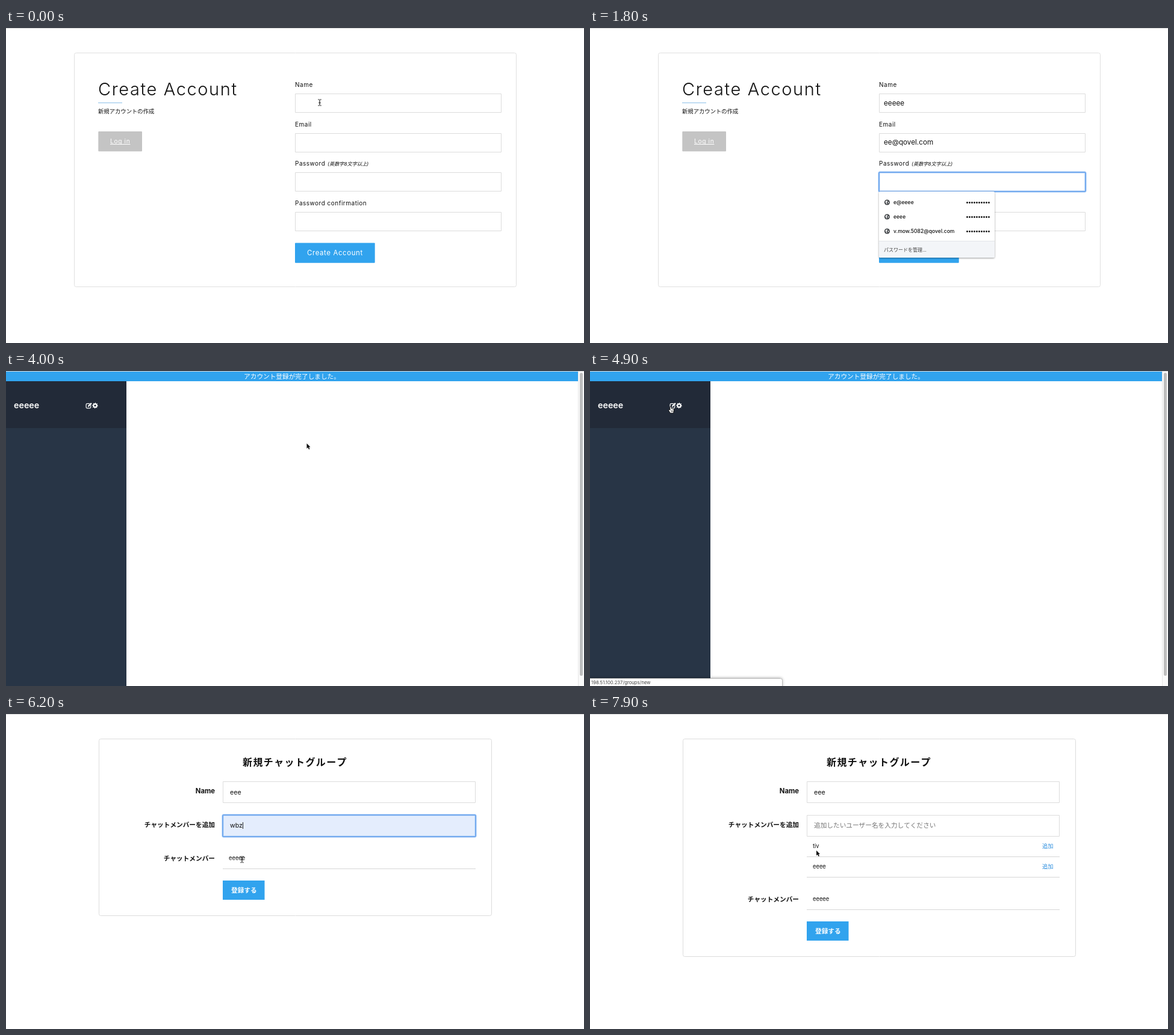
Recreate the animation shown at these times as an HTML page with a canvas. Size 960x524 px, loop 8000 ms.

```html
<!DOCTYPE html>
<html lang="ja">
<head>
<meta charset="utf-8">
<title>Sign up and new group</title>
<style>
html, body { margin: 0; width: 100%; height: 100%; overflow: hidden; background: #fff; }
canvas { display: block; width: 960px; height: 524px; }
</style>
</head>
<body>
<canvas id="stage" width="960" height="524"></canvas>
<script>
const ctx = document.getElementById('stage').getContext('2d');
const LOOP = 8000, STEP = 100;
const FONT = 'Inter, "Noto Sans CJK JP", "Noto Sans CJK", sans-serif';
const BLUE = '#31a3ee', EDGE = '#dcdcdc', INK = '#111';
const USER = 'eeeee', EMAIL = 'ee@qovel.com', GROUP = 'eee', QUERY = 'wbz';
const HOST = '198.51.100.237';

function text(s, x, y, size, o = {}) {
  ctx.font = `${o.style || ''} ${o.weight || 400} ${size}px ${FONT}`;
  ctx.letterSpacing = (o.gap || 0) + 'px';
  ctx.textAlign = o.align || 'left';
  ctx.fillStyle = o.color || INK;
  ctx.fillText(s, x, y);
  const width = ctx.measureText(s).width;
  ctx.letterSpacing = '0px';
  return width;
}

function rect(x, y, w, h, color, r = 0) {
  ctx.fillStyle = color;
  ctx.beginPath();
  ctx.roundRect(x, y, w, h, r);
  ctx.fill();
}

function frame(x, y, w, h, color = EDGE, r = 0, line = 1) {
  ctx.strokeStyle = color;
  ctx.lineWidth = line;
  ctx.beginPath();
  ctx.roundRect(x + .5, y + .5, w - 1, h - 1, r);
  ctx.stroke();
}

function disc(x, y, r, color) {
  ctx.fillStyle = color;
  ctx.beginPath();
  ctx.arc(x, y, r, 0, 7);
  ctx.fill();
}

function poly(points, fill, stroke, line = 1) {
  ctx.beginPath();
  points.forEach(([x, y]) => ctx.lineTo(x, y));
  ctx.closePath();
  if (stroke) {
    ctx.strokeStyle = stroke;
    ctx.lineWidth = line;
    ctx.stroke();
  }
  ctx.fillStyle = fill;
  ctx.fill();
}

function field(x, y, w, h, focused, fill = '#fff') {
  rect(x, y, w, h, fill);
  if (focused) {
    frame(x - .5, y - .5, w + 1, h + 1, '#c3dcfa', 2, 3.6);
    frame(x - .5, y - .5, w + 1, h + 1, '#74aaee', 1.5, 2);
  } else frame(x, y, w, h);
}

function popup(x, y, w, h) {
  ctx.save();
  ctx.shadowColor = 'rgba(0,0,0,.4)';
  ctx.shadowBlur = 3;
  ctx.shadowOffsetY = 1;
  rect(x, y, w, h, '#fff', 2);
  ctx.restore();
}

function suggestions(x, y, items, hovered = -1) {
  popup(x, y, 64, items.length * 24 + 11);
  items.forEach((item, i) => {
    if (i === hovered) rect(x, y + 6 + i * 24, 64, 24, '#e8e8e9');
    text(item, x + 8, y + 21 + i * 24, 8.5, { weight: 500 });
  });
}

function dots(n, x, y, pitch, r) {
  for (let i = 0; i < n; i++) disc(x + i * pitch, y, r, INK);
}

const between = (t, a, b) => t >= a && t < b;
const progress = (t, a, b) => Math.min(1, Math.max(0, (t - a) / (b - a)));
const count = (t, a, b, n) => Math.round(progress(t, a, b) * n);
const typed = (s, t, a, b) => s.slice(0, count(t, a, b, s.length));

// The caret stays lit for half a second after the last activity, then blinks.
function caret(t, since, x, y) {
  if ((t - since) % 1000 < 500) rect(Math.round(x), y, 1, 11, '#222');
}

function page() {
  rect(0, 0, 960, 524, '#fff');
  rect(0, 0, 960, 1, '#d8d8d8');
}

function statusBar(s) {
  ctx.save();
  ctx.shadowColor = 'rgba(0,0,0,.4)';
  ctx.shadowBlur = 5;
  rect(-4, 511, 323, 18, '#fff', 3);
  ctx.restore();
  frame(-4, 511, 324, 18, '#bbb', 3);
  text(s, 2, 521, 7.7, { color: '#444' });
}

function globe(x, y) {
  disc(x, y, 4.6, '#4a4d50');
  poly([[x - 3, y - 1], [x - 1, y - 3], [x + 1, y - 2], [x - 1, y], [x, y + 2], [x - 1, y + 3]], '#fff');
  poly([[x + 1, y], [x + 3.4, y - 1], [x + 2, y + 2]], '#fff');
}

function savedLogins() {
  popup(480, 272, 192, 110);
  ['e@eeee', 'eeee', 'v.mow.5082@qovel.com'].forEach((name, i) => {
    const y = 290 + i * 24;
    globe(493.5, y);
    text(name, 504, y + 3, 8.6, { weight: 500 });
    dots(10, 626.5, y + .5, 4, 1.4);
  });
  rect(480, 354, 192, 28, '#f3f5f8', [0, 0, 2, 2]);
  rect(480, 354, 192, 1, '#e3e5e8');
  text('パスワードを管理...', 488, 372, 8, { color: '#444' });
}

function signUp(t) {
  page();
  frame(113, 41, 735, 390, '#e0e0e0', 3);
  text('Create Account', 153, 111.5, 29, { weight: 300, gap: 1.6 });
  rect(153, 124, 40, 1, '#8abfe8');
  text('新規アカウントの作成', 153, 142, 9.33);
  rect(153.3, 172, 72.7, 33.3, '#c4c4c4', 1);
  const w = text('Log in', 173, 192, 10.3, { gap: .6, color: '#fff' });
  rect(173, 193, w, 1, '#fff');

  const focus = t < 400 ? -1 : t < 900 ? 0 : t < 1300 ? 1 : t < 2600 ? 2 : 3;
  ['Name', 'Email', 'Password', 'Password confirmation'].forEach((label, i) => {
    const y = 109 + Math.round(i * 65.7);
    text(label, 480, y - 11, 10, { gap: .5 });
    field(480, y, 343, 32, i === focus);
  });
  text('(英数字8文字以上)', 534, 229, 8.2, { style: 'italic' });

  const name = typed(USER, t, 450, 800), email = typed(EMAIL, t, 900, 1200);
  const nameW = text(name, 488, 128.5, 11.7), emailW = text(email, 488, 194, 11.7);
  const first = count(t, 1800, 2500, 10), second = count(t, 2700, 3400, 10);
  dots(first, 489.7, 256.6, 6.08, 1);
  dots(second, 489.7, 322.4, 6.08, 1);
  if (focus === 0) caret(t, Math.min(t, 800), 488 + nameW, 119);
  if (focus === 1) caret(t, Math.min(t, 1200), 488 + emailW, 184);
  if (focus === 2) caret(t, t < 1900 ? 1300 : Math.min(t, 2500), 488 + first * 5.85, 250);
  if (focus === 3) caret(t, Math.min(t, 3400), 488 + second * 5.85, 316);

  rect(480, 357.5, 132.7, 33.2, BLUE, 1);
  text('Create Account', 500, 378, 11.5, { gap: .57, color: '#fff' });
  if (between(t, 1400, 1900)) savedLogins();
  if (t >= 3600) statusBar(HOST + ' を待機しています...');
}

function editIcon(x, y) {
  ctx.strokeStyle = '#fff';
  ctx.lineWidth = 1.2;
  ctx.beginPath();
  ctx.roundRect(x + .6, y + 1.4, 7.6, 7.4, 1.5);
  ctx.stroke();
  poly([[x + 3.3, y + 6.8], [x + 3.8, y + 4.6], [x + 8.6, y - .3], [x + 10.2, y + 1.3], [x + 5.4, y + 6.2]],
    '#fff', '#222a38', 1);
}

function gearIcon(x, y) {
  const teeth = [];
  for (let i = 0; i < 32; i++) {
    const a = i * Math.PI / 16, r = i % 4 < 2 ? 4.8 : 3.6;
    teeth.push([x + r * Math.cos(a), y + r * Math.sin(a)]);
  }
  poly(teeth, '#fff');
  disc(x, y, 1.6, '#222a38');
}

function chat(t) {
  page();
  rect(0, 1, 950, 16, BLUE);
  text('アカウント登録が完了しました。', 475, 13, 10.67, { align: 'center', color: '#fff' });
  rect(0, 17, 200, 507, '#283546');
  rect(0, 17, 200, 78, '#222a38');
  text(USER, 13, 62, 14.3, { weight: 600, color: '#fff' });
  editIcon(132.5, 53);
  gearIcon(148, 57.5);
  rect(950, 1, 10, 523, '#fafafa');
  rect(950, 1, 1, 523, '#e6e6e6');
  rect(953, 3, 5, 504, '#bebebe', 2.5);
  if (t >= 5000) statusBar(HOST + ' を待機しています...');
  else if (t >= 4700) statusBar(HOST + '/groups/new');
}

function memberRow(name, y, addable) {
  text(name, 370, y + 3, 9.33);
  if (addable) text('追加', 751, y + 3, 9.33, { color: '#2f8fdf' });
  rect(360, y + 17, 420, 1, '#d6d6d6');
}

function newGroup(t) {
  page();
  const open = t >= 6700, shift = open ? 68 : 0;
  const onName = between(t, 5400, 5800), onMember = between(t, 5800, 7500);
  const filled = between(t, 6000, 6400);
  frame(154, 41, 653, 295 + shift, EDGE, 3);
  text('新規チャットグループ', 393, 86, 16, { weight: 700, gap: 1.4 });

  const label = (s, y, size = 10.67) => text(s, 347, y, size, { weight: 700, align: 'right' });
  label('Name', 132, 11.3);
  label('チャットメンバーを追加', 188);
  label('チャットメンバー', 244 + shift);

  field(360, 112, 420, 36, onName);
  const group = typed(GROUP, t, 5400, 5700);
  const groupW = text(group, 372, 134, 10.67);
  if (onName) caret(t, Math.min(t, 5700), 372 + groupW, 124);

  field(360, 168, 420, 36, onMember, filled ? '#e4edfd' : '#fff');
  const query = t < 6000 ? '' : QUERY.slice(0, 3 - count(t, 6300, 6600, 3));
  if (query) {
    const w = text(query, 372, 189, 10.67);
    caret(t, Math.min(t, 6600), 372 + w, 180);
  } else {
    text('追加したいユーザー名を入力してください', 372, 189, 10.67, { color: '#757575' });
    if (onMember) caret(t, Math.min(t, 6600), 371, 180);
  }

  if (open) {
    memberRow('tiv', 220, true);
    memberRow('eeee', 254, true);
  }
  memberRow(USER, 240 + shift);
  rect(360, 277 + shift, 69.5, 32, BLUE);
  text('登録する', 374, 297 + shift, 10.67, { weight: 700, color: '#fff' });

  if (between(t, 5500, 5800)) suggestions(360, 148, [USER, GROUP]);
  if (between(t, 5900, 6200))
    suggestions(360, 204, [USER, QUERY, 'tiv', 'eeee', GROUP], t >= 6000 ? 1 : -1);
}

const pointers = {
  beam(x, y) {
    const bar = (dx, dy, w, h) => rect(x + dx, y + dy, w, h, '#222');
    bar(-.6, -4.5, 1.2, 9);
    bar(-1.8, -.1, 3.6, 1);
    for (const side of [-1, 1]) {
      bar(-2.8, side * 5 - .5, 2.4, 1);
      bar(.4, side * 5 - .5, 2.4, 1);
    }
  },
  arrow(x, y) {
    poly([[x, y], [x, y + 8.5], [x + 2, y + 6.8], [x + 3.5, y + 10], [x + 5, y + 9.3],
      [x + 3.6, y + 6.2], [x + 6, y + 6]], '#111', '#fff', 1.6);
  },
  hand(x, y) {
    poly([[x - 2, y - 4], [x - .7, y - 4], [x, y - 1], [x + 4, y - .3], [x + 4, y + 3], [x + 3, y + 5.5],
      [x - 1.5, y + 5.5], [x - 4, y + 1.5], [x - 3.2, y + .6], [x - 1.4, y + 1.6]], '#fff', '#111', 1.6);
    for (const d of [0, 1.6, 3.2]) rect(x - .4 + d, y + 1.6, .7, 2.4, '#111');
  }
};

// Each leg: start, end, pointer, from, to.
const legs = [
  [0, 500, 'beam', [521, 124], [521, 124]],
  [3900, 4600, 'arrow', [521, 124], [133, 60]],
  [4600, 5100, 'hand', [135, 64], [135, 64]],
  [5100, 5300, 'arrow', [135, 64], [473, 130]],
  [5300, 5500, 'beam', [473, 130], [473, 130]],
  [5600, 5700, 'beam', [473, 160], [473, 187]],
  [5700, 5900, 'beam', [473, 187], [473, 187]],
  [5900, 6100, 'arrow', [473, 187], [392, 242]],
  [6100, 6300, 'beam', [392, 242], [392, 242]],
  [7400, 7700, 'arrow', [392, 238], [376, 227]],
  [7700, 8000, 'arrow', [376, 227], [376, 227]]
];

function pointer(t) {
  const leg = legs.find(([a, b]) => between(t, a, b));
  if (!leg) return;
  const [a, b, kind, from, to] = leg;
  const p = progress(t, a, b), k = p * p * (3 - 2 * p);
  pointers[kind](from[0] + (to[0] - from[0]) * k, from[1] + (to[1] - from[1]) * k);
}

function draw(now) {
  const t = Math.floor(now % LOOP / STEP) * STEP;
  (t < 3900 ? signUp : t < 5200 ? chat : newGroup)(t);
  pointer(t);
  requestAnimationFrame(draw);
}
requestAnimationFrame(draw);
</script>
</body>
</html>
```
